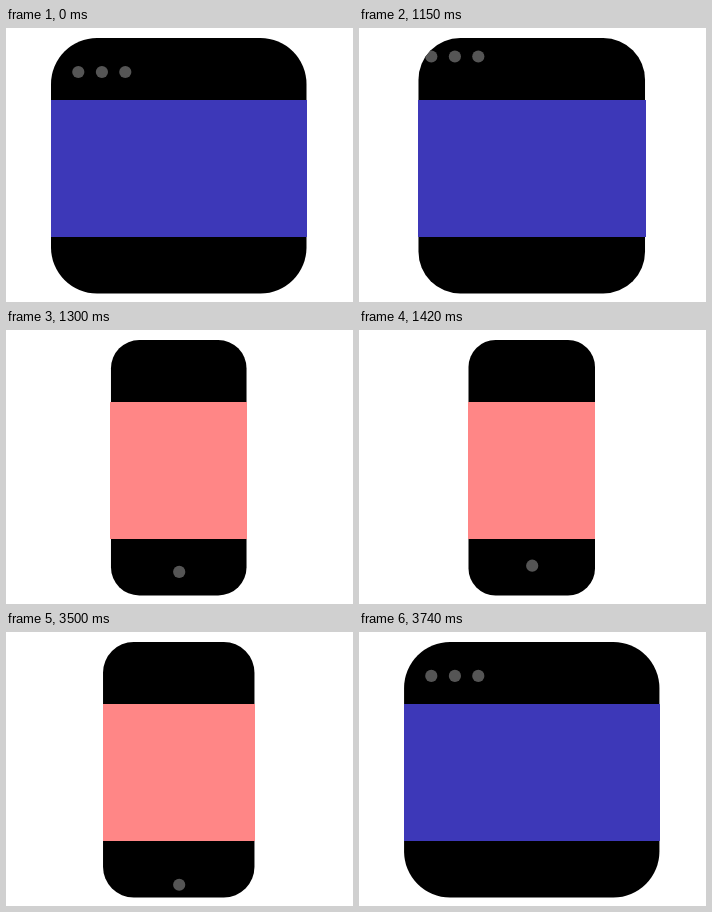
An HTML page with a canvas for the animation above (4770 ms loop, 347 by 274 pixels).

```html
<!DOCTYPE html>
<html lang="en">
<head>
<meta charset="utf-8">
<title>Browser to phone</title>
<style>
  html, body { margin: 0; width: 100%; height: 100%; overflow: hidden; background: #fff; }
  canvas { display: block; }
</style>
</head>
<body>
<canvas id="stage" width="347" height="274"></canvas>
<script>
  const ctx = document.getElementById('stage').getContext('2d');
  const LOOP = 4770, TICK = 30, STEPS = 14;
  const CENTER = 172.75, TOP = 10, HEIGHT = 255.5;
  const GREY = '#555', BLUE = '#3d38b8', PINK = '#ff8686';

  const lerp = (a, b, p) => a + (b - a) * p;
  const easeInOut = p => p < 0.5 ? 4 * p ** 3 : 1 - 4 * (1 - p) ** 3;

  // Eased progress in whole ticks; lead is the head start in ticks.
  function ramp(time, start, lead) {
    if (time < start) return 0;
    const tick = Math.floor((time - start) / TICK);
    return easeInOut(Math.min(1, (tick + lead) / STEPS));
  }

  // 0 = browser window, 1 = phone
  function phoneAmount(time) {
    return ramp(time, 1030, 1.36) - ramp(time, 3350, 0.1);
  }

  function dot(x, y) {
    ctx.beginPath();
    ctx.arc(x, y, 6.1, 0, Math.PI * 2);
    ctx.fill();
  }

  function draw(amount) {
    const width = lerp(255.5, 126.5, amount);
    const left = CENTER - width / 2;

    ctx.fillStyle = '#fff';
    ctx.fillRect(0, 0, 347, 274);

    ctx.save();
    ctx.beginPath();
    ctx.roundRect(left, TOP, width, HEIGHT, lerp(46, 27, amount));
    ctx.fillStyle = '#000';
    ctx.fill();
    ctx.clip();
    ctx.fillStyle = GREY;
    const dotsY = lerp(44, -25, amount);
    [72.3, 95.9, 119.3].forEach(x => dot(x, dotsY));
    dot(173.2, lerp(324, 235.7, amount));
    ctx.restore();

    // The screen snaps outward to whole pixels.
    const screenLeft = Math.floor(left);
    ctx.fillStyle = amount > 0.5 ? PINK : BLUE;
    ctx.fillRect(screenLeft, 72, Math.ceil(left + width) - screenLeft, 137);
  }

  const begin = performance.now();
  function frame() {
    draw(phoneAmount((performance.now() - begin) % LOOP));
    requestAnimationFrame(frame);
  }
  frame();
</script>
</body>
</html>
```
